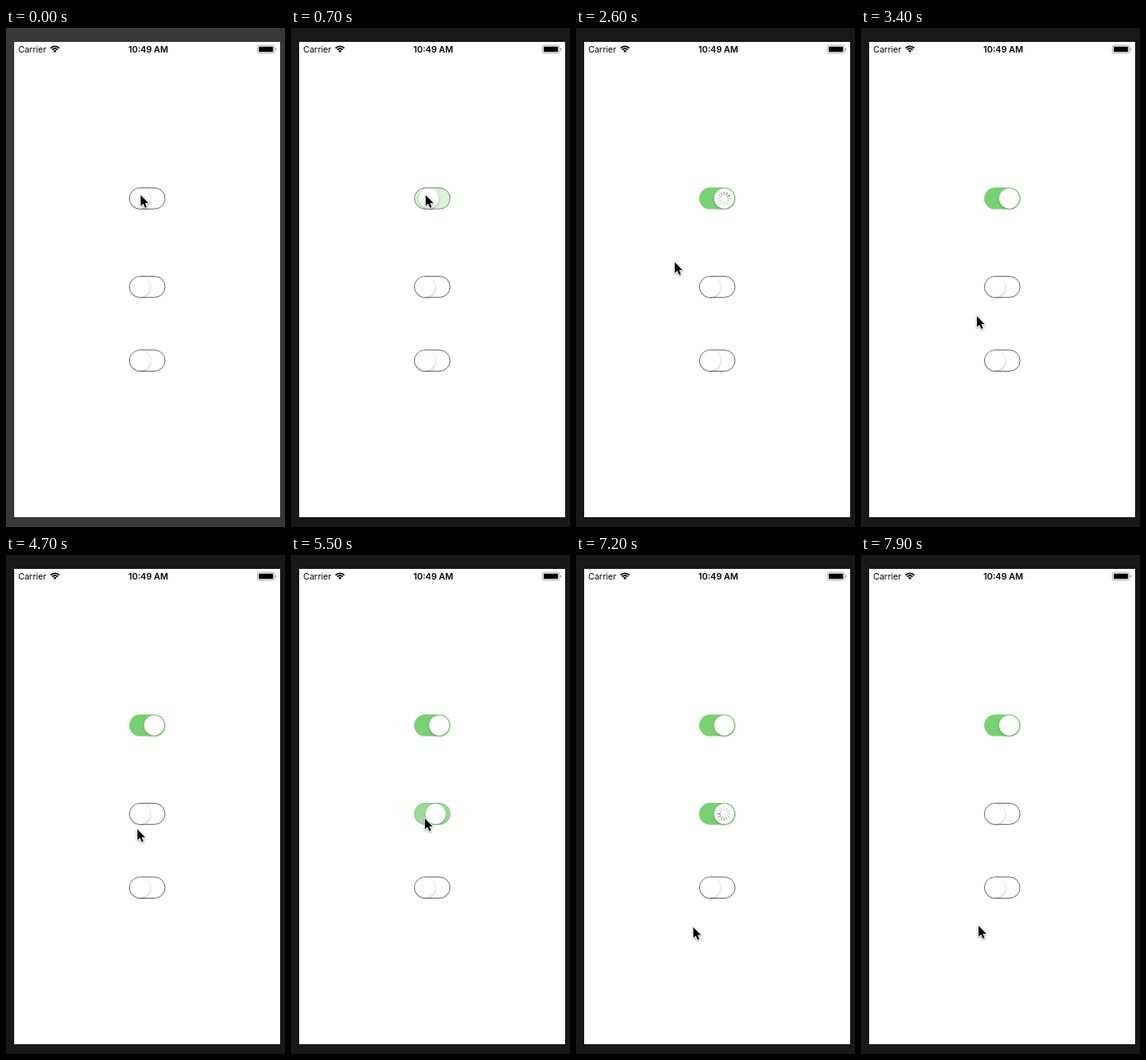
An HTML page with a canvas that plays this animation: 342x610 px, repeating every 8 s.

```html
<!DOCTYPE html>
<html lang="en">
<head>
<meta charset="utf-8">
<title>Loading switches</title>
<style>
html, body { margin: 0; width: 100%; height: 100%; overflow: hidden; background: #181818; }
canvas { display: block; width: 342px; height: 610px; }
</style>
</head>
<body>
<canvas id="stage"></canvas>
<script>
const W = 342, H = 610, LOOP = 8000, STEP = 100, SLIDE = 300, LOAD = 2000;
const canvas = document.getElementById('stage');
const ratio = window.devicePixelRatio || 1;
canvas.width = W * ratio;
canvas.height = H * ratio;
const c = canvas.getContext('2d');

// Pointer moves: each runs from the last position along a slightly bent line
const home = { x: 164.6, y: 204.2 };
const moves = [
  { from: 900, to: 1400, x: 145.6, y: 214.2 },
  { from: 1500, to: 2400, x: 117.6, y: 284 },
  { from: 2400, to: 2600, x: 120.6, y: 286.2 },
  { from: 2600, to: 3400, x: 141.6, y: 352.2, bend: 18 },
  { from: 3400, to: 3500, x: 157.4, y: 348.2 },
  { from: 4100, to: 4700, x: 160.6, y: 335.2 },
  { from: 4700, to: 5000, x: 163.6, y: 322 },
  { from: 5500, to: 6200, x: 83.6, y: 348 },
  { from: 6200, to: 7100, x: 143.6, y: 455 },
  { from: 7100, to: 7900, x: 143.6, y: 453.2, bend: -2 }
];

const switches = [
  { y: 208.3, on: 700 },
  { y: 316.4, on: 5400, fails: true },
  { y: 406.6, on: Infinity }
];

const clamp = v => Math.max(0, Math.min(1, v));
const ease = v => v * v * (3 - 2 * v);
const slide = (t, start) => ease(clamp((t - start + STEP) / SLIDE));

function pointerAt(t) {
  let { x, y } = home;
  for (const m of moves) {
    if (t < m.from) break;
    const p = ease(clamp((t - m.from) / (m.to - m.from)));
    const dx = m.x - x, dy = m.y - y;
    const side = (m.bend || 0) * 4 * p * (1 - p) / Math.hypot(dx, dy);
    x += dx * p - dy * side;
    y += dy * p + dx * side;
  }
  return [x, y];
}

function pill(x, y, w, h, r) {
  c.beginPath();
  c.roundRect(x, y, w, h, r);
}

function shadow(color, blur, dy) {
  c.shadowColor = color;
  c.shadowBlur = blur * ratio;
  c.shadowOffsetY = dy * ratio;
}

function spinner(x, y, t) {
  const head = Math.floor(t * 0.012 + 7.5) % 12;
  c.save();
  c.translate(x, y);
  c.lineWidth = 1.3;
  c.lineCap = 'round';
  for (let i = 0; i < 12; i++) {
    const age = (head - i + 12) % 12;
    c.strokeStyle = `rgba(105,105,105,${Math.max(0.28, 0.82 - age * 0.09)})`;
    c.beginPath();
    c.moveTo(0, -4.7);
    c.lineTo(0, -7.8);
    c.stroke();
    c.rotate(Math.PI / 6);
  }
  c.restore();
}

function drawSwitch({ y, on, fails }, t) {
  const done = on + LOAD;
  const p = slide(t, on) * (fails ? 1 - slide(t, done) : 1);
  const knob = 164.4 + 17.3 * p;

  pill(151, y - 13.3, 44.4, 26.6, 13.3);
  c.fillStyle = `rgba(120,209,115,${p})`;
  c.fill();
  pill(151.4, y - 12.9, 43.6, 25.8, 12.9);
  c.lineWidth = 0.9;
  c.strokeStyle = `rgba(85,85,85,${1 - p})`;
  c.stroke();

  c.save();
  shadow('rgba(0,0,0,0.28)', 3, 1);
  c.fillStyle = '#fff';
  c.beginPath();
  c.arc(knob, y, 12.4, 0, 7);
  c.fill();
  c.restore();

  if (t >= on + 200 && t < done) spinner(knob, y, t);
}

function statusBar() {
  c.fillStyle = '#000';
  c.font = '400 10.5px Inter, Roboto, sans-serif';
  c.fillText('Carrier', 15, 30);
  c.font = '600 10.6px Inter, Roboto, sans-serif';
  c.fillText('10:49 AM', 150, 30);

  const a = -Math.PI * 0.75, b = -Math.PI * 0.25;
  c.strokeStyle = '#000';
  c.lineWidth = 1.9;
  for (const r of [7.6, 4.8]) {
    c.beginPath();
    c.arc(60, 30, r, a, b);
    c.stroke();
  }
  c.beginPath();
  c.moveTo(60, 30);
  c.arc(60, 30, 2.8, a, b);
  c.fill();

  pill(308.2, 21.1, 20.8, 9.8, 2.2);
  c.lineWidth = 0.8;
  c.strokeStyle = '#999';
  c.stroke();
  pill(309.8, 22.7, 17.6, 6.6, 0.9);
  c.fill();
  pill(330, 24.5, 1.2, 3, 0.6);
  c.fillStyle = '#999';
  c.fill();
}

function pointer(x, y) {
  c.save();
  c.translate(x, y);
  c.beginPath();
  c.moveTo(0.5, 0);
  for (const [px, py] of [[0.5, 13.2], [3.6, 10.5], [5.8, 15.6], [8, 14.7], [5.8, 9.7], [10, 9.7]])
    c.lineTo(px, py);
  c.closePath();
  c.save();
  shadow('rgba(0,0,0,0.4)', 2.5, 1);
  c.lineWidth = 1.8;
  c.lineJoin = 'round';
  c.strokeStyle = '#fff';
  c.stroke();
  c.restore();
  c.fillStyle = '#000';
  c.fill();
  c.restore();
}

function draw(now) {
  const t = Math.floor((now % LOOP) / STEP) * STEP;
  c.setTransform(ratio, 0, 0, ratio, 0, 0);
  c.fillStyle = t < 700 ? '#383838' : '#181818';
  c.fillRect(0, 0, W, H);
  c.fillStyle = '#fff';
  c.fillRect(10, 17, 326, 581);
  statusBar();
  for (const s of switches) drawSwitch(s, t);
  pointer(...pointerAt(t));
}

let start;
function tick(now) {
  start ??= now;
  draw(now - start);
  requestAnimationFrame(tick);
}
draw(0);
requestAnimationFrame(tick);
</script>
</body>
</html>
```
